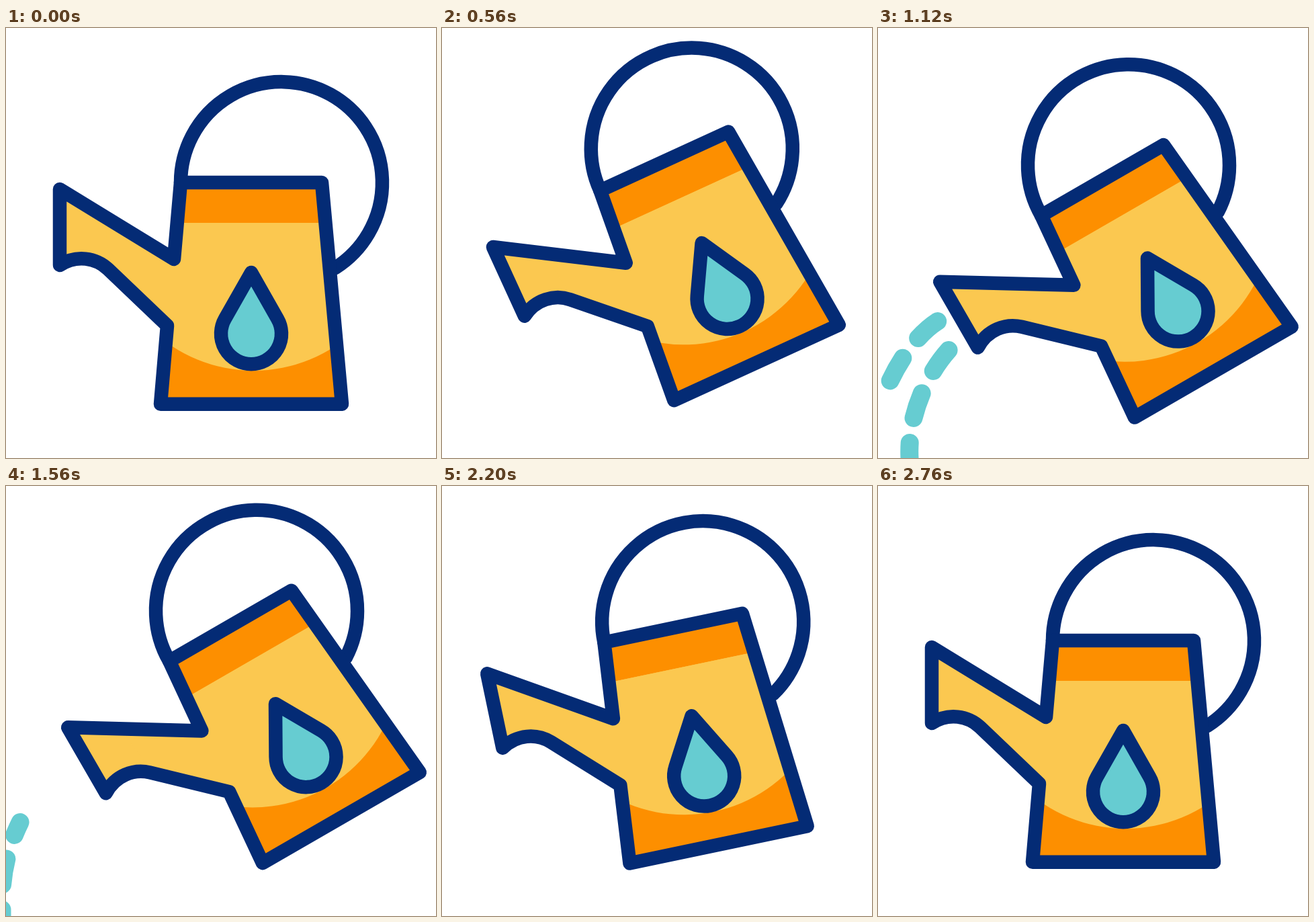
These frames come from a looping animation (640 px wide and 640 px high, 3000 ms). An HTML page with a canvas:

```html
<!DOCTYPE html>
<html>
<head>
<meta charset="utf-8">
<style>
  html, body { margin: 0; width: 100%; height: 100%; overflow: hidden; background: #fff; }
  canvas { display: block; width: 640px; height: 640px; }
</style>
</head>
<body>
<canvas id="stage" width="640" height="640"></canvas>
<script>
const ctx = document.getElementById('stage').getContext('2d');
const NAVY = '#042b75', AMBER = '#fbc850', ORANGE = '#fd8f00', TEAL = '#66ccd1';
const LOOP = 3000, STEP = 40, CENTER = 320, TILT = Math.PI / 6;

const progress = (t, from, to) => Math.min(1, Math.max(0, (t - from) / (to - from)));
const quad = u => u < 0.5 ? 2 * u * u : 1 - 2 * (1 - u) * (1 - u);

// Smooth 0 to 1 between two times
function ease(t, from, to) {
  const u = progress(t, from, to);
  return u * u * (3 - 2 * u);
}

// Lean back, swing over the plants, hold, return
const driftX = t => -6 * ease(t, 0, 300) + 26 * ease(t, 300, 810)
  - 25.5 * ease(t, 1600, 2400) + 5.5 * ease(t, 2400, 2760);

// Lift, dip while pouring, lift again, settle
const driftY = t => -21.2 * ease(t, 0, 570) + 29.5 * ease(t, 570, 1200)
  - 27.8 * ease(t, 1200, 1760) + 19.5 * ease(t, 1760, 2760);

const tilt = t => -TILT * (quad(progress(t, 0, 800)) - ease(t, 1600, 2650));

const body = new Path2D('M260 230H470L500 559.7H230L240 443L152 359' +
  'C134 342 105 337 80 353V240L250 344Z');
const handle = new Path2D('M260 230A150 150 0 1 1 490 357');
const drop = new Path2D('M365 364L404 432.7A45 45 0 1 1 326 432.7Z');

// Each stream path begins LEAD px inside the spout
const LEAD = 60, SPEED = 0.55, DASH = 38.5, PERIOD = 76;
const streams = [
  { start: 708, pour: 400, path: new Path2D('M181 421L132 456C86 486 43 566 47 640V720') },
  { start: 913, pour: 452, path: new Path2D('M137 402L88 437C43 466 -7 548 -6 630V720') }
];

function outline(path) {
  ctx.strokeStyle = NAVY;
  ctx.lineWidth = 20.5;
  ctx.stroke(path);
}

function drawStream({ start, pour, path }, t) {
  const front = SPEED * (t - start);
  const tail = Math.max(-LEAD, front - SPEED * pour);
  ctx.strokeStyle = TEAL;
  ctx.lineWidth = 27;
  for (let end = front; end > tail; end -= PERIOD) {
    const from = Math.max(tail, end - DASH);
    ctx.setLineDash([end - from, 9999]);
    ctx.lineDashOffset = -(from + LEAD);
    ctx.stroke(path);
  }
  ctx.setLineDash([]);
}

function drawCan() {
  outline(handle);
  ctx.save();
  ctx.clip(body);
  ctx.fillStyle = ORANGE;
  ctx.fillRect(200, 220, 320, 360);
  ctx.fillStyle = AMBER;
  ctx.fillRect(60, 290, 440, 130);
  ctx.fillRect(60, 220, 193, 200);
  ctx.fillRect(60, 340, 188, 130);
  ctx.beginPath();
  ctx.arc(368.5, 290, 220, 0, Math.PI);
  ctx.fill();
  ctx.restore();
  outline(body);
  ctx.fillStyle = TEAL;
  ctx.fill(drop);
  outline(drop);
}

function draw(t) {
  ctx.setTransform(1, 0, 0, 1, 0, 0);
  ctx.fillStyle = '#fff';
  ctx.fillRect(0, 0, 640, 640);
  ctx.lineCap = ctx.lineJoin = 'round';
  ctx.translate(CENTER + driftX(t), CENTER + driftY(t));
  ctx.rotate(tilt(t));

  // Streams are laid out for the fully tilted can
  ctx.save();
  ctx.rotate(TILT);
  ctx.translate(-CENTER - 20, -CENTER - 7);
  streams.forEach(s => drawStream(s, t));
  ctx.restore();

  ctx.translate(-CENTER, -CENTER);
  drawCan();
}

const origin = performance.now();
function tick() {
  const t = (performance.now() - origin) % LOOP;
  draw(Math.floor(t / STEP) * STEP);
  requestAnimationFrame(tick);
}
tick();
</script>
</body>
</html>
```
